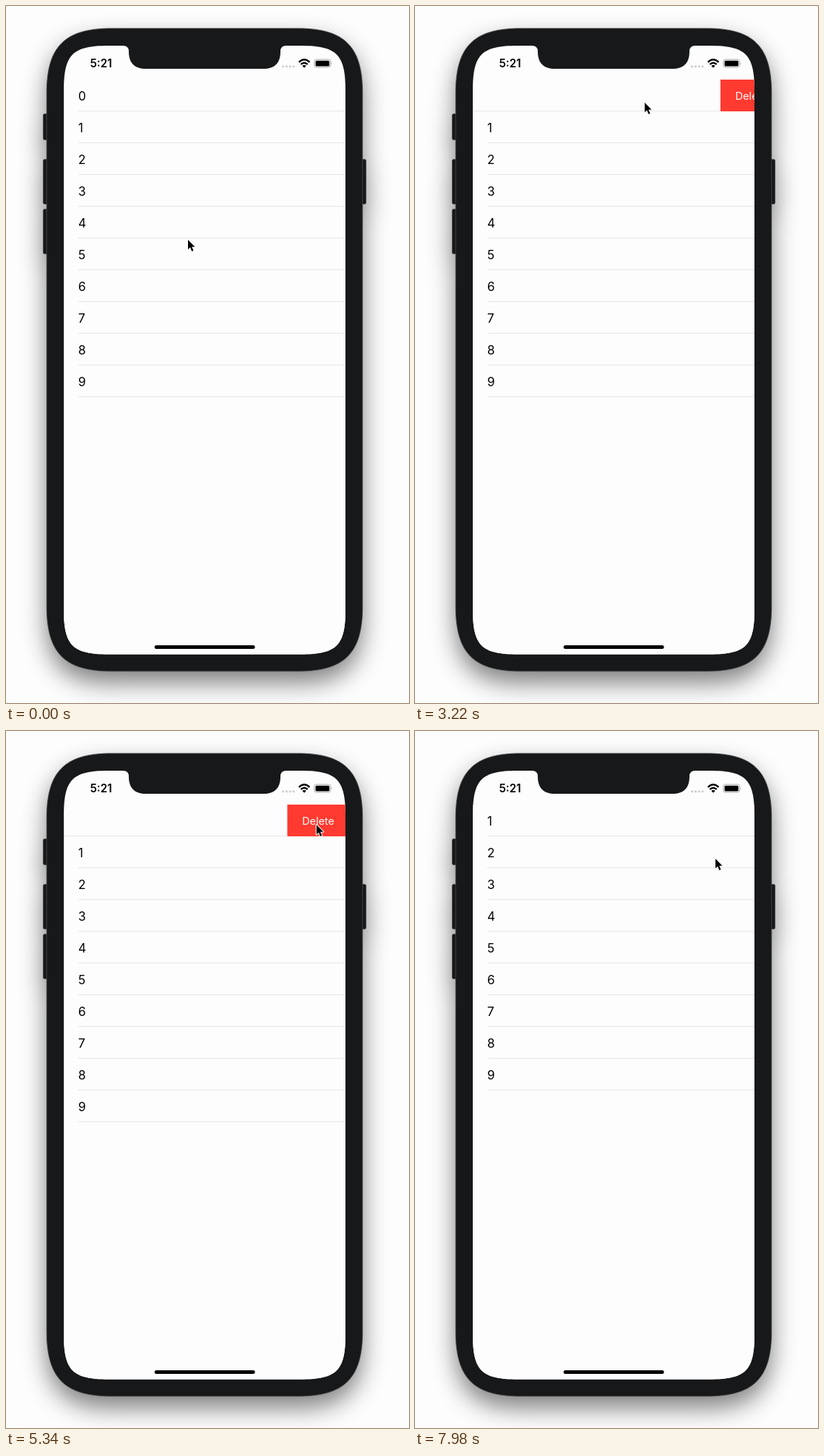
These frames come from a looping animation (558 px wide and 966 px high, 8 s). An HTML page:

```html
<!DOCTYPE html>
<html lang="en">
<head>
<meta charset="utf-8">
<title>Swipe to delete</title>
<style>
  @property --pull { syntax: "<number>"; inherits: true; initial-value: 0; }
  @property --gone { syntax: "<number>"; inherits: true; initial-value: 0; }

  html, body { margin: 0; width: 100%; height: 100%; overflow: hidden; background: #fdfdfd; }
  svg {
    display: block; width: 558px; height: 966px;
    font-family: Inter, Roboto, sans-serif;
    animation: pull 8s infinite, gone 8s infinite;
  }
  .paper { fill: #fdfdfd; }
  .bezel { fill: #17181a; }
  .ink { fill: #000; }
  .row { font-size: 17px; }
  .line { fill: #e6e6ea; }
  .time { font-size: 15.3px; font-weight: 600; }
  .action { font-size: 14.7px; fill: #fff; }

  .swipe { transform: translateX(calc(var(--pull) * -1px)); }
  .label { transform: translateX(calc(min(var(--pull), 80.5) * -1px)); }
  .edge { transform: translate(calc(var(--pull) * -1px), calc(var(--gone) * -44px)); }
  .rest { transform: translateY(calc(var(--gone) * -44px)); }
  .cursor { animation: cursor 8s infinite; }

  @keyframes pull {
    0%, 35.5% { --pull: 0; animation-timing-function: ease-in-out; }
    46.5%, 50% { --pull: 122; animation-timing-function: ease-out; }
    54.5%, 79.85% { --pull: 80.5; animation-timing-function: ease-in-out; }
    83.6%, 100% { --pull: 390; }
  }
  @keyframes gone {
    0%, 79.85% { --gone: 0; animation-timing-function: ease-in-out; }
    83.6%, 100% { --gone: 1; }
  }
  @keyframes cursor {
    0% { transform: translate(252px, 324px); animation-timing-function: ease-in-out; }
    14% { transform: translate(376px, 143px); }
    17% { transform: translate(376px, 143px); animation-timing-function: ease-in-out; }
    26%, 35% { transform: translate(374px, 133px); animation-timing-function: ease-in-out; }
    46.5%, 52% { transform: translate(243px, 135px); animation-timing-function: ease-in-out; }
    65% { transform: translate(428px, 130px); }
    70%, 85% { transform: translate(431px, 130px); animation-timing-function: ease-in-out; }
    97%, 100% { transform: translate(416px, 177px); }
  }
</style>
</head>
<body>
<svg viewBox="0 0 558 966">
  <defs>
    <g id="phone">
      <rect x="51.5" y="149.5" width="8" height="36" rx="2"/>
      <rect x="51.5" y="212.5" width="8" height="62" rx="2"/>
      <rect x="51.5" y="281.5" width="8" height="62" rx="2"/>
      <rect x="490.5" y="212.5" width="8" height="62" rx="2"/>
      <path id="body"/>
    </g>
    <path id="screen"/>
    <clipPath id="screenClip"><use href="#screen"/></clipPath>
    <filter id="shade" x="-30%" y="-30%" width="160%" height="160%"><feGaussianBlur stdDeviation="17"/></filter>
  </defs>

  <use href="#phone" y="16" opacity=".5" filter="url(#shade)"/>
  <use href="#phone" class="bezel" stroke="#48494b" stroke-width=".8"/>
  <use href="#screen" class="paper"/>

  <g clip-path="url(#screenClip)">
    <g class="swipe">
      <text class="row ink" x="100" y="130.5">0</text>
      <rect x="470" y="102" width="390" height="44" fill="#ff3a30"/>
    </g>
    <text class="label action" x="490.5" y="129.5">Delete</text>
    <rect class="edge line" x="100" y="145" width="370" height="1"/>
    <g class="rest" id="rest">
      <rect class="paper" x="80" y="146" width="390" height="800"/>
    </g>
  </g>

  <path class="bezel" d="M162 54 V55 Q170 55 170 63 C170 79 178 87 194 87 H356 C372 87 380 79 380 63 Q380 55 388 55 V54 Z"/>
  <text class="time ink" x="116.5" y="85.4">5:21</text>
  <g fill="#cdcdd0">
    <circle cx="383.7" cy="83.8" r="1.6"/><circle cx="388.5" cy="83.8" r="1.6"/>
    <circle cx="393.3" cy="83.8" r="1.6"/><circle cx="398.1" cy="83.8" r="1.6"/>
  </g>
  <g fill="none" stroke="#000" stroke-width="2.4">
    <path d="M405.6 77.8 Q413 70.8 420.4 77.8"/>
    <path d="M408.3 80.9 Q413 76.6 417.7 80.9"/>
  </g>
  <path class="ink" d="M410.4 83 Q413 80.7 415.6 83 L413 85.8 Z"/>
  <rect x="426.9" y="74" width="22.6" height="11" rx="3" fill="none" stroke="#a6a6a8"/>
  <rect class="ink" x="428.6" y="75.7" width="19.2" height="7.8" rx="1.6"/>
  <path d="M450.6 77.7 Q452.4 79.5 450.6 81.4 Z" fill="#a6a6a8"/>
  <rect class="ink" x="205.7" y="886" width="139" height="5" rx="2.5"/>

  <path class="cursor" d="M0 0 V13.4 L3 10.6 L5.3 16 L7.6 15 L5.3 9.8 H9.6 Z"
        fill="#000" stroke="#fff" stroke-width="2" stroke-linejoin="round" paint-order="stroke"/>
</svg>
<script>
  // Rounded box whose corners reach `c` along the sides, with handles ending `k` from each corner.
  function smoothBox(x, y, w, h, c, k) {
    const r = x + w, b = y + h;
    return `M${x} ${y + c}C${x} ${y + k} ${x + k} ${y} ${x + c} ${y}H${r - c}` +
      `C${r - k} ${y} ${r} ${y + k} ${r} ${y + c}V${b - c}` +
      `C${r} ${b - k} ${r - k} ${b} ${r - c} ${b}H${x + c}` +
      `C${x + k} ${b} ${x} ${b - k} ${x} ${b - c}Z`;
  }
  document.getElementById("body").setAttribute("d", smoothBox(56.3, 31, 437.4, 891, 90, 25));
  document.getElementById("screen").setAttribute("d", smoothBox(80, 55, 390, 843.5, 62, 12));

  let rows = "";
  for (let i = 1; i < 10; i++) {
    rows += `<text class="row ink" x="100" y="${130.5 + 44 * i}">${i}</text>` +
      `<rect class="line" x="100" y="${145 + 44 * i}" width="370" height="1"/>`;
  }
  document.getElementById("rest").insertAdjacentHTML("beforeend", rows);
</script>
</body>
</html>
```
